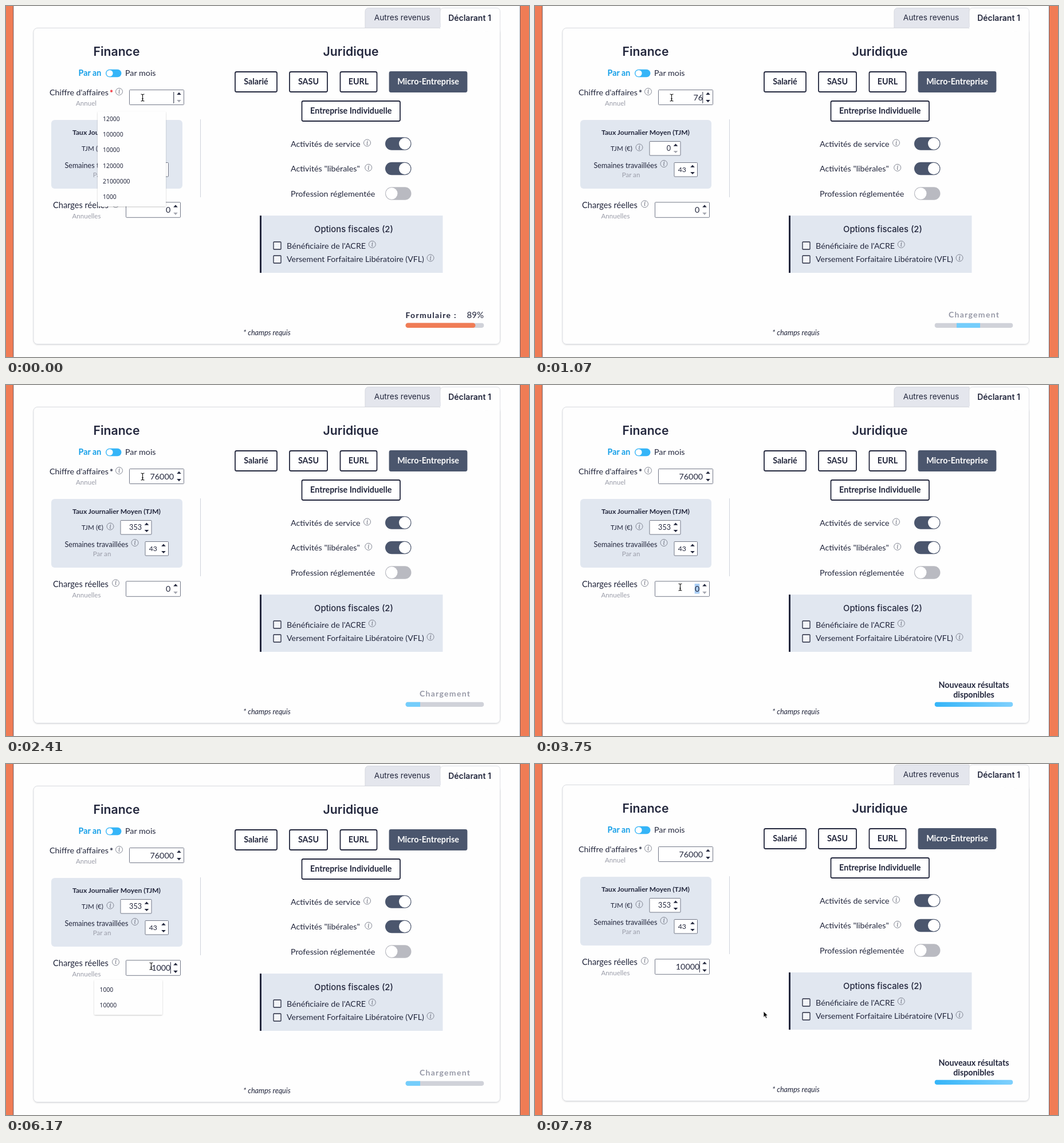
An HTML page for the animation above (8 s loop, 913 by 613 pixels).

```html
<!DOCTYPE html>
<html lang="fr">
<head>
<meta charset="utf-8">
<title>Formulaire</title>
<style>
html, body { margin: 0; width: 100%; height: 100%; overflow: hidden; background: #fefefe; }
svg { display: block; width: 913px; height: 613px; }
text { font-family: Lato, "Open Sans", sans-serif; font-size: 14.3px; fill: #23273d; white-space: pre; }
.b { font-weight: 700; }
.m { text-anchor: middle; }
.e { text-anchor: end; }
.geo { font-family: Inter, sans-serif; }
.h { font-size: 21.2px; font-weight: 600; }
.sub { font-size: 11.6px; fill: #9b9da9; }
.wide { letter-spacing: 1.3px; font-size: 14px; }
.item { font-family: "Noto Sans", sans-serif; font-size: 10.4px; }
.info { font-family: "Noto Serif", serif; font-style: italic; font-size: 10px; fill: #666a78; }
.s12 { font-size: 12.3px; }
.s13 { font-size: 12.6px; }
</style>
</head>
<body>
<svg id="stage" viewBox="0 0 913 613"></svg>
<script>
const LOOP = 8000;
const INK = '#23273d', SLATE = '#4b566d', PANEL = '#e1e7f0', SKY = '#35b5f8', ORANGE = '#f07c55';
const AMOUNTS = ['12000', '100000', '10000', '120000', '21000000', '1000'];
const SAVED = ['1000', '10000'];

// Each step changes only the named parts. A numeric status is the right edge of the loading block.
const steps = [
  [0, { sales: '', rate: '0', costs: '0', caret: 'sales', status: 'form', list: 'sales', picked: false, y: 0, pointer: ['beam', 238.5, 160] }],
  [530, { caret: '' }],
  [800, { sales: '7', caret: 'sales', list: '', status: 22 }],
  [1070, { sales: '76', status: 80 }],
  [1330, { status: 142 }],
  [1600, { sales: '760', rate: '3', status: 22 }],
  [1870, { sales: '7600', rate: '35', status: 84 }],
  [2140, { sales: '76000', rate: '353', status: 146 }],
  [2410, { caret: '', status: 26 }],
  [2680, { caret: 'sales', status: 'done', pointer: ['beam', 230, 166] }],
  [2940, { caret: '', pointer: ['beam', 247.5, 351] }],
  [3210, { pointer: ['beam', 254.5, 353] }],
  [3480, { picked: true }],
  [3750, { pointer: ['beam', 253.5, 353] }],
  [5370, { costs: '1', picked: false, caret: 'costs', list: 'costs', status: 24 }],
  [5640, { costs: '10', status: 84 }],
  [5910, { costs: '100', status: 146 }],
  [6170, { costs: '1000', status: 26 }],
  [6440, { costs: '10000', list: '', status: 84 }],
  [6710, { status: 142 }],
  [6980, { caret: '', status: 'done' }],
  [7240, { pointer: ['arrow', 326, 378] }],
  [7510, { caret: 'costs', pointer: ['arrow', 399, 432] }],
  [7780, { y: -2 }]
];

// Text is placed by the middle of its capitals.
const text = (x, y, str, cls = '', extra = '') =>
  `<text x="${x}" y="${y}" dy=".36em" class="${cls}" ${extra}>${str}</text>`;
const rect = (x, y, w, h, fill, r = 0, extra = '') =>
  `<rect x="${x}" y="${y}" width="${w}" height="${h}" rx="${r}" fill="${fill}" ${extra}/>`;
const line = (w, color = INK) => `stroke="${color}" stroke-width="${w}"`;
const path = (d, extra) => `<path d="${d}" ${extra}/>`;

const info = (x, y) =>
  `<circle cx="${x}" cy="${y}" r="6" fill="none" ${line(0.9, '#777b88')}/>` + text(x, y, 'i', 'info m');

const button = (x, y, w, label, on) =>
  rect(x + 1, y + 1, w - 2, 35, on ? SLATE : '#fff', 2.5, line(1.8, on ? SLATE : INK)) +
  text(x + w / 2, y + 18, label, 'b m', on ? 'style="fill:#fff"' : '');

const toggle = (y, on) => {
  const color = on ? SLATE : '#b9bac1';
  return rect(662, y - 11.3, 45.5, 22.6, color, 11.3) +
    `<circle cx="${on ? 696.2 : 673.3}" cy="${y}" r="10.2" fill="#fff"/>`;
};

const field = (x, y, w, h, value, edge, cls = '', low = false) => {
  const mid = y + h / 2, ax = x + w - 8.5, gap = h / 4;
  return rect(x, y, w, h, '#fff', 1, line(1, '#737888')) +
    text(edge, mid, value, 'e ' + cls) +
    path(`M${ax - 3.8} ${mid - gap + 2}h7.6l-3.8 -4.2z`, `fill="${INK}"`) +
    path(`M${ax - 3.8} ${mid + gap - 2}h7.6l-3.8 4.2z`, `fill="${low ? '#a5a7b0' : INK}"`);
};

const list = (x, y, h, items, tx, ty) =>
  rect(x, y, 119, h, '#fefefe', 2, 'filter="url(#lift)"') +
  items.map((s, i) => text(tx, ty + i * 27.35, s, 'item')).join('');

const caret = (x, y) => rect(x, y, 1, 20, INK);

function frame() {
  return rect(0, 0, 13, 613, ORANGE) + rect(897.5, 0, 15.5, 613, ORANGE) +
    rect(12.3, 0, 1, 613, '#6b5f66') + rect(897, 0, 1, 613, '#6b5f66');
}

function card() {
  return path('M627 38.5V10q0 -6.5 6.5 -6.5H758V38.5z', `fill="#e4e6ed" ${line(1, '#d6d8df')}`) +
    rect(48, 38.5, 814.5, 552, '#fefefe', 7, `${line(1, '#d9dbe0')} filter="url(#soft)"`) +
    path('M758 40V10q0 -6.5 6.5 -6.5h91.5q6.5 0 6.5 6.5V46', `fill="#fefefe" ${line(1, '#dfe1e6')}`) +
    rect(757, 30, 2, 8, '#e4e6ed') + rect(758, 37, 104, 5, '#fefefe') +
    text(691.5, 20.5, 'Autres revenus', 'geo m', 'style="font-size:13.7px"') +
    text(809.5, 20.5, 'Déclarant 1', 'geo m', 'style="font-size:14px;font-weight:600"');
}

function finance(s) {
  return text(193, 79.5, 'Finance', 'geo h m') +
    text(126.5, 117, 'Par an', 'b', 'style="fill:#159fe8"') +
    rect(174, 110.7, 27.5, 13.6, SKY, 6.8) + '<circle cx="181" cy="117.5" r="5.6" fill="#fff"/>' +
    text(208, 117, 'Par mois') +
    text(76, 151, "Chiffre d'affaires") +
    text(181, 152, '*', 'b', s.sales ? '' : 'style="fill:#f0141e"') +
    info(197.5, 149.5) + text(140, 170, 'Annuel', 'sub m') +
    field(215.5, 146.5, 95, 26, s.sales, 293, '', !s.sales) +
    rect(79, 199, 229, 120, PANEL, 6) +
    text(193, 220.5, 'Taux Journalier Moyen (TJM)', 'b m', 'style="font-size:12.1px"') +
    text(132, 249, 'TJM (€)', '', 'style="font-size:11.7px"') + info(182, 247) +
    field(200, 236.5, 54, 24.5, s.rate, 237, 's13', s.rate === '0') +
    text(102.5, 278, 'Semaines travaillées', 's13') + info(225, 275.5) +
    text(167.5, 295, 'Par an', 'sub m') +
    field(243, 273.5, 40.5, 24.5, '43', 264, 's12') +
    rect(339, 198, 1, 136, '#cfd3dc') +
    text(82, 347.5, 'Charges réelles', '', 'style="font-size:14.6px"') + info(191.5, 345.8) +
    text(140.5, 366.5, 'Annuelles', 'sub m') +
    field(209.5, 342.8, 95, 26.5, '', 287, '', s.costs === '0') +
    (s.picked ? rect(278.7, 347, 8.6, 17.5, '#a9cdf4') : '') +
    text(287.3, 356, s.costs, 'e');
}

function legal() {
  return text(602, 79.5, 'Juridique', 'geo h m') +
    button(399, 114, 75, 'Salarié') + button(494, 114, 68, 'SASU') +
    button(582.5, 114, 66, 'EURL') + button(668.5, 114, 137, 'Micro-Entreprise', true) +
    button(515.5, 165, 173.5, 'Entreprise Individuelle') +
    text(497, 240.5, 'Activités de service') + info(630.5, 239) + toggle(240.5, true) +
    text(497, 284, 'Activités "libérales"') + info(632.7, 282.3) + toggle(284, true) +
    text(497, 327.5, 'Profession réglementée') + toggle(327.5, false) +
    rect(443, 366, 319.5, 100, PANEL) + rect(443, 366, 3, 100, INK) +
    text(607, 390, 'Options fiscales (2)', 'geo m', 'style="font-size:14.8px;font-weight:500"') +
    [418.5, 442.5].map(y => rect(467, y - 6.5, 13, 13, '#f3f5f9', 1, line(1.3))).join('') +
    text(490, 418.5, "Bénéficiaire de l'ACRE") + info(639.3, 416.3) +
    text(490, 442.3, 'Versement Forfaitaire Libératoire (VFL)', '', 'style="font-size:14.1px"') + info(741, 440);
}

function status(s) {
  const bar = (x, w, fill) => rect(x, 553.5, w, 8.6, fill, 0, 'clip-path="url(#track)"');
  const track = bar(697.5, 137, '#d0d2d9');
  if (s.status === 'form') {
    return text(697.5, 540, 'Formulaire :', 'b wide') +
      text(834, 540, '89%', 'e', 'style="font-size:15px"') + track +
      rect(697.5, 553.5, 122, 8.6, ORANGE, 4.3);
  }
  if (s.status === 'done') {
    return text(766, 523.5, 'Nouveaux résultats', 'b m') + text(766, 540.5, 'disponibles', 'b m') +
      bar(697.5, 137, 'url(#sky)');
  }
  return text(766.6, 538.5, 'Chargement', 'b wide m', 'style="fill:#9799a7"') + track +
    bar(697 + s.status - 41, 41, '#74cdfb');
}

function pointer([kind, x, y]) {
  if (kind === 'beam') {
    const d = `M${x - 3} ${y - 6}q3 0 3 1.8v8.4q0 1.8 -3 1.8M${x + 3} ${y - 6}q-3 0 -3 1.8v8.4q0 1.8 3 1.8M${x - 1.5} ${y + 2}h3`;
    return path(d, `fill="none" ${line(2.6, '#fff')}`) + path(d, `fill="none" ${line(1.1, '#111')}`);
  }
  return path(`M${x} ${y}v10.4l2.4 -2.2l1.8 4l1.9 -.9l-1.8 -3.8h3.2z`,
    `fill="#0a0a0a" ${line(0.8, '#fff')} stroke-linejoin="round"`);
}

const defs = `<defs>
  <filter id="lift" x="-10%" y="-10%" width="120%" height="125%"><feDropShadow dx="0" dy="1" stdDeviation="1.3" flood-color="#000" flood-opacity=".22"/></filter>
  <filter id="soft" x="-2%" y="-2%" width="104%" height="104%"><feDropShadow dx="0" dy="1" stdDeviation="1.2" flood-color="#000" flood-opacity=".12"/></filter>
  <linearGradient id="sky"><stop stop-color="${SKY}"/><stop offset="1" stop-color="#7fd0fd"/></linearGradient>
  <clipPath id="track">${rect(697.5, 553.5, 137, 8.6, '#000', 4.3)}</clipPath>
</defs>`;

function draw(s) {
  const page = card() + finance(s) + legal() + status(s) +
    text(455.5, 570.5, '* champs requis', 'm s13', 'font-style="italic"') +
    (s.caret === 'sales' ? caret(292.3, 150) : '') +
    (s.caret === 'costs' ? caret(286.8, 346) : '') +
    (s.list === 'sales' ? list(160, 184, 166, AMOUNTS, 169, 197) : '') +
    (s.list === 'costs' ? list(154, 377, 61, SAVED, 163.5, 394) : '');
  return defs + frame() + `<g transform="translate(0 ${s.y})">${page}</g>` + pointer(s.pointer);
}

const stage = document.getElementById('stage');
let shown = 0;

function tick() {
  const t = performance.now() % LOOP;
  const past = steps.filter(([at]) => at <= t);
  if (past.length !== shown) {
    shown = past.length;
    stage.innerHTML = draw(Object.assign({}, ...past.map(([, change]) => change)));
  }
  requestAnimationFrame(tick);
}
tick();
</script>
</body>
</html>
```
